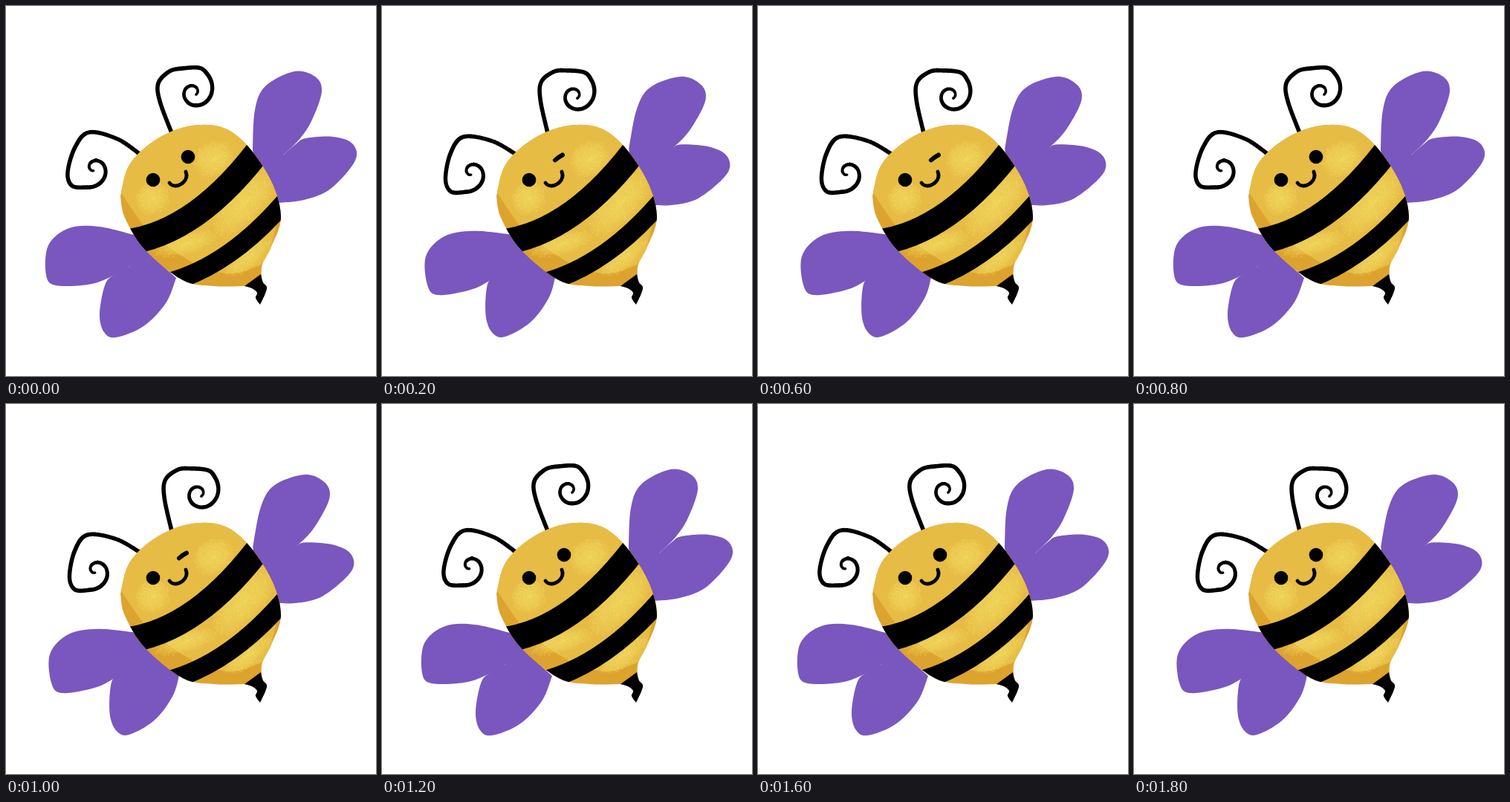
Animation, 498 px wide and 498 px high, one loop 2 s. Source, as an HTML page with a canvas:

```html
<!DOCTYPE html>
<html lang="en">
<head>
<meta charset="utf-8">
<title>Winking bee</title>
<style>
  html, body { margin: 0; width: 100%; height: 100%; overflow: hidden; background: #fff; }
  canvas { display: block; width: 498px; height: 498px; }
</style>
</head>
<body>
<canvas id="stage" width="498" height="498"></canvas>
<script>
const SIZE = 498, BEAT = 200, BEATS = 10;
const WINKS = [1, 3, 5];
const INK = '#000', PURPLE = '#7957be', DARK = '#dda32f', GOLD = '#e7bc45', LIGHT = '242,220,98';
const RAD = Math.PI / 180;

const points = text => text.split(' ').map(p => p.split(',').map(Number));

// Cubic handles of a Catmull-Rom curve through the points.
function segments(pts) {
  const at = i => pts[Math.max(0, Math.min(pts.length - 1, i))];
  return pts.slice(1).map((end, i) => {
    const [a, b, d] = [at(i - 1), pts[i], at(i + 2)];
    return [b,
      [b[0] + (end[0] - a[0]) / 6, b[1] + (end[1] - a[1]) / 6],
      [end[0] - (d[0] - b[0]) / 6, end[1] - (d[1] - b[1]) / 6],
      end];
  });
}

// Joins smooth curves with straight lines into one closed outline.
function outline(...curves) {
  const path = new Path2D();
  curves.forEach((text, n) => {
    const pts = points(text);
    path[n ? 'lineTo' : 'moveTo'](...pts[0]);
    for (const [, c1, c2, end] of segments(pts)) path.bezierCurveTo(...c1, ...c2, ...end);
  });
  path.closePath();
  return path;
}

// A stem that runs into a shrinking spiral, drawn with a tapering round brush.
function feeler(stem, { cx, cy, size, decay, from, to, angle }) {
  const pts = points(stem);
  for (let turn = from; turn <= to; turn += 25) {
    const r = size * Math.exp(-turn / decay), a = angle(turn) * RAD;
    pts.push([cx + r * Math.cos(a), cy + r * Math.sin(a)]);
  }
  const segs = segments(pts), path = new Path2D(), steps = 30;
  segs.forEach((s, i) => {
    for (let k = 0; k < steps; k++) {
      const t = k / steps, u = 1 - t, q = (i + t) / segs.length;
      const [x, y] = [0, 1].map(n =>
        u * u * u * s[0][n] + 3 * u * u * t * s[1][n] + 3 * u * t * t * s[2][n] + t * t * t * s[3][n]);
      const r = 2.8 - 1.1 * q * q;
      path.moveTo(x + r, y);
      path.arc(x, y, r, 0, Math.PI * 2);
    }
  });
  return path;
}

// Each part swings round its pivot by the given degrees on every other beat.
const parts = [
  { color: PURPLE, pivot: [345, 195], swing: 8,
    path: outline('332,194 335,140 349,108 388,88 416,95 425,115 412,153 396,178 373,201', '345,248') },
  { color: PURPLE, pivot: [345, 180], swing: 8,
    path: outline('373,201 391,185 404,178 440,176 466,185 470,208 437,246 401,261 366,265', '335,205') },
  { color: PURPLE, pivot: [165, 315], swing: -8,
    path: outline('172,308 125,297 85,299 57,322 54,362 67,376 110,375 138,366 167,350', '205,345') },
  { color: PURPLE, pivot: [150, 318], swing: -8,
    path: outline('167,350 145,362 133,376 126,415 132,439 148,446 185,431 215,400 229,366', '180,322') },
  { color: INK, pivot: [223, 171], swing: 8,
    path: feeler('223,171 207,128 205,104 220,88 238,84',
      { cx: 252, cy: 116, size: 25, decay: 250, from: -75, to: 400, angle: t => t }) },
  { color: INK, pivot: [181, 200], swing: -5,
    path: feeler('181,200 150,179 112,170 93,190 83,224 89,242',
      { cx: 118, cy: 218, size: 25, decay: 185, from: -20, to: 360, angle: t => 90 - t }) }
];

const shell = outline('154,256 166,214 200,181 245,162 290,163 325,188 358,238 370,285 357,324 345,348 344,366',
  '321,377 280,377 238,369 187,328 160,285 154,256');
const lit = outline('150,244 187,297 222,327 262,350 305,360 352,345', '400,140 150,140');
const sting = outline('321,377 343,361', '343,361 346,372 351,378 349,387 342,402', '342,402 336,393 338,386 331,380 321,377');

let seed = 7;
function random() {
  seed = (seed * 16807) % 2147483647;
  return seed / 2147483647;
}

// Soft chalk spot: a glow with grain that thins out towards the rim.
function dab(g, x, y, rx, ry, turn) {
  g.save();
  g.translate(x, y);
  g.rotate(turn * RAD);
  g.scale(rx, ry);
  const glow = g.createRadialGradient(0, 0, 0, 0, 0, 1);
  glow.addColorStop(0, `rgba(${LIGHT},0.6)`);
  glow.addColorStop(0.6, `rgba(${LIGHT},0.4)`);
  glow.addColorStop(1, `rgba(${LIGHT},0)`);
  g.fillStyle = glow;
  g.fillRect(-1, -1, 2, 2);
  g.fillStyle = `rgba(${LIGHT},0.4)`;
  for (let i = rx * ry * 0.6; i > 0; i--) {
    const a = random() * Math.PI * 2, d = random() ** 0.7;
    g.fillRect(Math.cos(a) * d, Math.sin(a) * d, 1.3 / rx, 1.3 / ry);
  }
  g.restore();
}

function stripe(g, width, x1, y1, cx, cy, x2, y2) {
  g.lineWidth = width;
  g.beginPath();
  g.moveTo(x1, y1);
  g.quadraticCurveTo(cx, cy, x2, y2);
  g.stroke();
}

function paintBody() {
  const layer = document.createElement('canvas');
  layer.width = layer.height = SIZE;
  const g = layer.getContext('2d');
  g.save();
  g.clip(shell);
  g.fillStyle = DARK;
  g.fillRect(0, 0, SIZE, SIZE);
  g.fillStyle = GOLD;
  g.fill(lit);

  dab(g, 197, 259, 24, 22, -30);
  dab(g, 279, 206, 28, 24, -30);
  dab(g, 320, 265, 56, 25, -48);
  dab(g, 240, 320, 44, 14, -15);
  dab(g, 325, 338, 38, 14, -40);

  g.strokeStyle = INK;
  stripe(g, 34.5, 160, 318, 258, 307, 348, 184);
  stripe(g, 25.5, 215, 373, 302, 351, 380, 258);
  g.restore();
  g.fillStyle = INK;
  g.fill(sting);
  return layer;
}

const ctx = document.getElementById('stage').getContext('2d');
const body = paintBody();

function drawPart({ color, pivot: [x, y], swing, path }, up) {
  ctx.save();
  ctx.translate(x, y);
  ctx.rotate(up * swing * RAD);
  ctx.translate(-x, -y);
  ctx.fillStyle = color;
  ctx.fill(path);
  ctx.restore();
}

function eye(x, y) {
  ctx.beginPath();
  ctx.arc(x, y, 9.3, 0, Math.PI * 2);
  ctx.fill();
}

function drawFace(wink) {
  ctx.fillStyle = ctx.strokeStyle = INK;
  ctx.lineCap = 'round';
  eye(198, 234);
  if (wink) {
    ctx.lineWidth = 6;
    ctx.beginPath();
    ctx.moveTo(233, 207.5);
    ctx.quadraticCurveTo(237, 203.5, 243, 200.5);
    ctx.stroke();
  } else {
    eye(245, 203);
  }
  ctx.lineWidth = 4.8;
  ctx.beginPath();
  ctx.moveTo(220, 238);
  ctx.bezierCurveTo(224, 244, 233, 243, 239, 237);
  ctx.bezierCurveTo(243, 233, 244, 228, 242, 223);
  ctx.stroke();
}

function draw(beat) {
  ctx.fillStyle = '#fff';
  ctx.fillRect(0, 0, SIZE, SIZE);
  parts.forEach(p => drawPart(p, beat % 2));
  ctx.drawImage(body, 0, 0);
  drawFace(WINKS.includes(beat));
}

const start = performance.now();
let shown = -1;
function tick() {
  const beat = Math.floor((performance.now() - start) / BEAT) % BEATS;
  if (beat !== shown) draw(shown = beat);
  requestAnimationFrame(tick);
}
tick();
</script>
</body>
</html>
```
